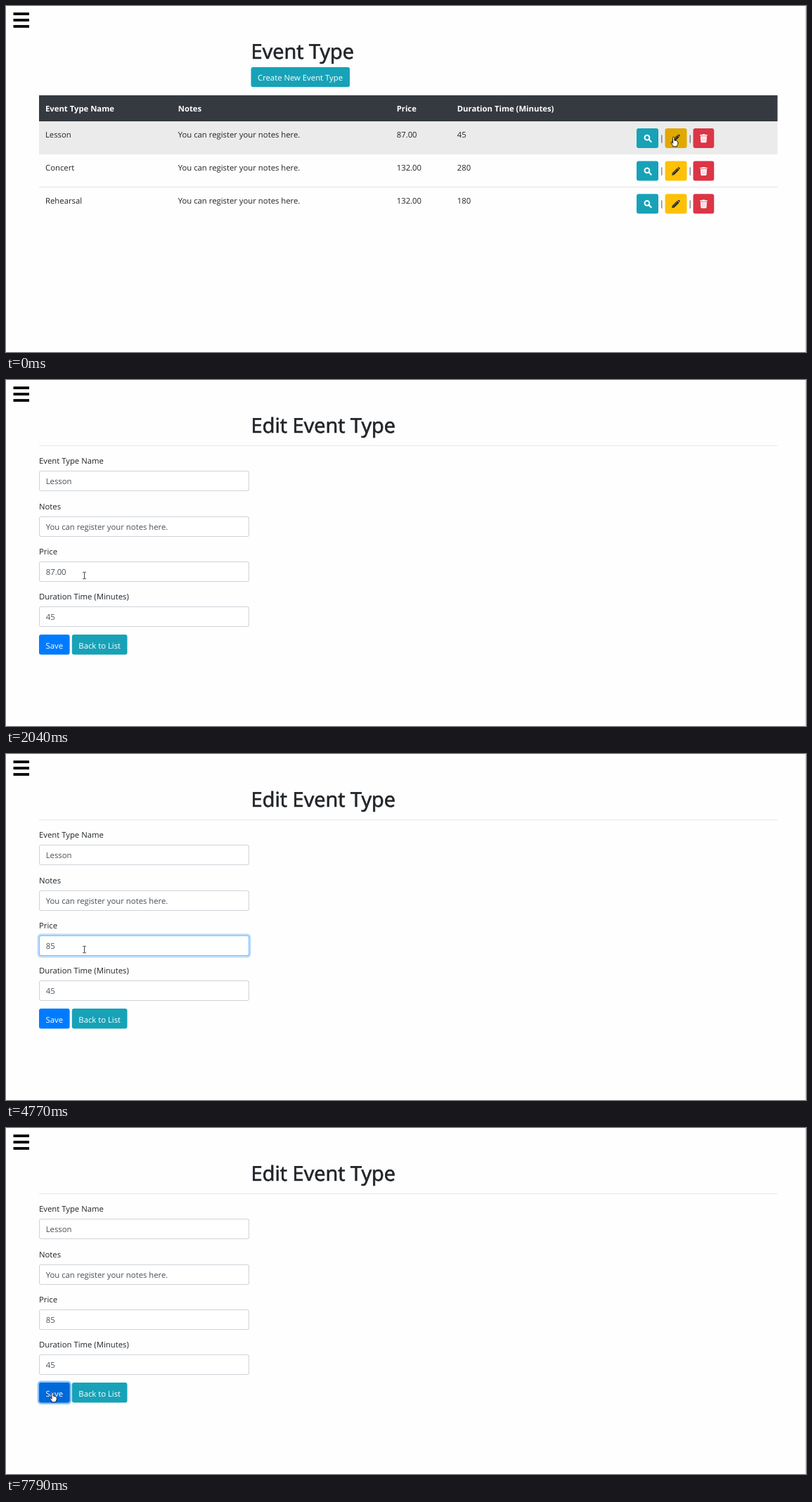
Recreate the animation shown at these times as an HTML page with a canvas. Size 1138 by 492 pixels, loop 8000 ms.

```html
<!DOCTYPE html>
<html lang="en">
<head>
<meta charset="utf-8">
<title>Event Type</title>
<style>
  html, body { margin: 0; width: 100%; height: 100%; overflow: hidden; background: #fefefe; }
  canvas { display: block; width: 1138px; height: 492px; }
</style>
</head>
<body>
<canvas id="stage"></canvas>
<script>
const W = 1138, H = 492, LOOP = 8000;
const canvas = document.getElementById('stage');
const ctx = canvas.getContext('2d');
const dpr = window.devicePixelRatio || 1;
canvas.width = W * dpr;
canvas.height = H * dpr;

const FAMILY = '"Open Sans", "Noto Sans", sans-serif';
const BODY = `11.32px ${FAMILY}`;
const BOLD = `bold 11.3px ${FAMILY}`;
const TITLE = `29px ${FAMILY}`;
const INK = '#212529', TEAL = '#17a2b8', YELLOW = '#ffc107', RED = '#dc3545';
const NOTE = 'You can register your notes here.';
const ROWS = [
  ['Lesson', '87.00', '45'],
  ['Concert', '132.00', '280'],
  ['Rehearsal', '132.00', '180']
];

// Pointer stops: start time, shape, x, y
const POINTER = [
  [0, hand, 949.6, 186.3],
  [1540, arrow, 768.5, 188.5],
  [1890, arrow, 128.5, 289.5],
  [2040, beam, 111.5, 278],
  [4890, beam, 91.5, 277],
  [5040, arrow, 205.5, 298.5],
  [5160, beam, 330.5, 336],
  [5310, arrow, 180.5, 357.5],
  [5430, hand, 66, 376.3]
];

// Price field contents over time
const PRICE = [[0, '87.00'], [3930, '8'], [4210, '85']];

// Intervals in which the caret is lit
const CARET = [[2470, 2840], [3930, 4770], [5310, 5840], [6400, 6800], [7360, 7660]];

const at = (list, t) => list.filter(e => e[0] <= t).pop();
const within = (t, a, b) => t >= a && t < b;

// Two-step transition: half way at a, complete at b
const twoStep = (t, a, b) => t < a ? 0 : t < b ? 0.5 : 1;

function text(str, x, y, color = INK, font = BODY, align = 'left') {
  ctx.font = font;
  ctx.fillStyle = color;
  ctx.textAlign = align;
  ctx.fillText(str, x, y);
}

// A thin outline gives the regular face a medium weight
function title(str) {
  text(str, 348.5, 75, INK, TITLE);
  ctx.strokeStyle = INK;
  ctx.lineWidth = 0.7;
  ctx.lineJoin = 'miter';
  ctx.strokeText(str, 348.5, 75);
}

function rect(x, y, w, h, color) {
  ctx.fillStyle = color;
  ctx.fillRect(x, y, w, h);
}

function box(x, y, w, h, r, color) {
  ctx.beginPath();
  ctx.roundRect(x, y, w, h, r);
  ctx.fillStyle = color;
  ctx.fill();
}

function ring(x, y, w, h, color, strength) {
  if (!strength) return;
  ctx.save();
  ctx.globalAlpha = strength;
  ctx.beginPath();
  ctx.roundRect(x - 1.2, y - 1.2, w + 2.4, h + 2.4, 4);
  ctx.strokeStyle = color;
  ctx.lineWidth = 2.4;
  ctx.stroke();
  ctx.restore();
}

function overlay(x, y, w, h, color, strength) {
  ctx.globalAlpha = strength;
  box(x, y, w, h, 3, color);
  ctx.globalAlpha = 1;
}

function shape(d, x, y, fill, stroke, width = 1) {
  ctx.save();
  ctx.translate(x, y);
  const path = new Path2D(d);
  if (fill) {
    ctx.fillStyle = fill;
    ctx.fill(path);
  }
  if (stroke) {
    ctx.strokeStyle = stroke;
    ctx.lineWidth = width;
    ctx.lineJoin = ctx.lineCap = 'round';
    ctx.stroke(path);
  }
  ctx.restore();
}

function hand(x, y) {
  shape('M-1.2 1Q-1.2-.2 0-.2Q1.2-.2 1.2 1V5Q2.2 4.4 3 5.2Q4 4.8 4.6 5.8Q6 5.6 6.2 7V10L5 12V13.5H-1V12.2L-3.6 8.6Q-3.6 7-2.4 7.4L-1.2 8.8Z',
    x, y, '#fff', '#111', 0.9);
}

function arrow(x, y) {
  shape('M0 0V12L2.8 9.4L4.6 13.6L6.4 12.8L4.7 8.8H8Z', x, y, '#fff', '#111', 0.8);
}

function beam(x, y) {
  shape('M-2-4.7H-.6L0-4.2L.6-4.7H2M0-4.2V4.2M-2 4.7H-.6L0 4.2L.6 4.7H2', x, y, null, '#333', 0.9);
}

function search(x, y) {
  shape('M2.3-1.1A3.4 3.4 0 1 1-4.5-1.1A3.4 3.4 0 1 1 2.3-1.1M1.5 1.5L4.7 4.8', x, y, null, '#fff', 2);
}

function pencil(x, y) {
  shape('M-5.8 5.8L-5.3 2.6L1.8-4.5L4.5-1.8L-2.6 5.3ZM2.5-5.1L3.3-5.6Q4-6 4.6-5.4L5.5-4.5Q6-3.9 5.6-3.3L5.1-2.5Z', x, y, INK);
  shape('M-3 2.2L1.6-2.4M-4.4 3.4L-3.5 4.4', x, y, null, YELLOW, 0.6);
}

function trash(x, y) {
  shape('M-5.2-5.2H-2.2L-1.6-6H1.6L2.2-5.2H5.2V-3.7H-5.2ZM-4.5-3H4.5L4 5Q3.9 6 3 6H-3Q-3.9 6-4 5Z', x, y, '#fff');
  shape('M-2-1.3V4.2M0-1.3V4.2M2-1.3V4.2', x, y, null, 'rgba(220,53,69,.55)', 0.6);
}

function frame() {
  rect(0, 0, W, H, '#fefefe');
  rect(1137, 0, 1, H, '#cfcfcf');
  for (let i = 0; i < 3; i++) rect(10.5, 9.3 + i * 8.9, 22.5, 3.8, '#000');
}

function listPage(t) {
  title('Event Type');
  box(348.5, 87, 140.5, 28.2, 3, TEAL);
  text('Create New Event Type', 358, 106.3, '#fff');

  const cols = [56, 244.7, 555.7, 641.7];
  rect(47, 127, 1050.5, 37, '#343a40');
  ['Event Type Name', 'Notes', 'Price', 'Duration Time (Minutes)']
    .forEach((s, i) => text(s, cols[i], 150.3, '#fff', BOLD));
  rect(47, 164, 1050.5, 47, '#ebebeb');
  rect(47, 257, 1050.5, 1, '#dee2e6');

  ROWS.forEach(([name, price, minutes], i) => {
    const y = 174 + i * 46.6;
    [name, NOTE, price, minutes].forEach((s, c) => text(s, cols[c], y + 13.4));
    box(897, y, 31, 28, 3, TEAL);
    search(913, y + 14.3);
    if (i === 0 && t >= 500) ring(937.5, y, 31, 28, 'rgba(222,170,12,.5)', 1);
    box(937.5, y, 31, 28, 3, i ? YELLOW : '#e0a800');
    pencil(953, y + 14.3);
    box(977.5, y, 29.7, 28, 3, RED);
    trash(992.4, y + 14.3);
    text('|', 932.8, y + 17.6, INK, BODY, 'center');
    text('|', 973, y + 17.6, INK, BODY, 'center');
  });
}

function field(label, value, i, focus = 0) {
  const y = Math.round(129.4 + i * 64.2);
  text(label, 47, y - 10.1);
  ring(47, y, 299, 29, 'rgba(0,123,255,.27)', focus);
  box(47, y, 299, 29, 3, '#ced4da');
  if (focus) overlay(47, y, 299, 29, '#80bdff', focus);
  box(48, y + 1, 297, 27, 2.2, '#fff');
  text(value, 56.7, y + 19.3, '#495057');
}

function editPage(t) {
  title('Edit Event Type');
  rect(47, 93, 1050.5, 1, '#e8e8e8');

  const price = at(PRICE, t)[1];
  const saved = twoStep(t, 7660, 7790);
  field('Event Type Name', 'Lesson', 0);
  field('Notes', NOTE, 1);
  field('Price', price, 2, twoStep(t, 2470, 2590) - saved);
  field('Duration Time (Minutes)', '45', 3);

  if (within(t, 2840, 3930)) {
    rect(56.5, 264, 28.5, 16, '#3367d1');
    text(price, 56.7, 277.3, '#fff');
  }
  if (CARET.some(([a, b]) => within(t, a, b))) {
    ctx.font = BODY;
    rect(Math.round(56.4 + ctx.measureText(price).width), 264, 1, 16, '#333');
  }

  ring(47, 362, 43.6, 28.6, 'rgba(38,143,255,.5)', saved);
  box(47, 362, 43.6, 28.6, 3, '#007bff');
  overlay(47, 362, 43.6, 28.6, '#0069d9', twoStep(t, 5430, 5560));
  text('Save', 56.5, 381.5, '#fff');
  box(93.8, 362, 78.7, 28.6, 3, TEAL);
  text('Back to List', 103.3, 381.5, '#fff');
}

function draw(t) {
  ctx.setTransform(dpr, 0, 0, dpr, 0, 0);
  ctx.textBaseline = 'alphabetic';
  ctx.textRendering = 'geometricPrecision';
  frame();
  if (t < 960) listPage(t);
  else editPage(t);
  const [, cursor, x, y] = at(POINTER, t);
  cursor(x, y);
}

let start;
function tick(now) {
  start ??= now;
  draw((now - start) % LOOP);
  requestAnimationFrame(tick);
}
draw(0);
requestAnimationFrame(tick);
</script>
</body>
</html>
```
